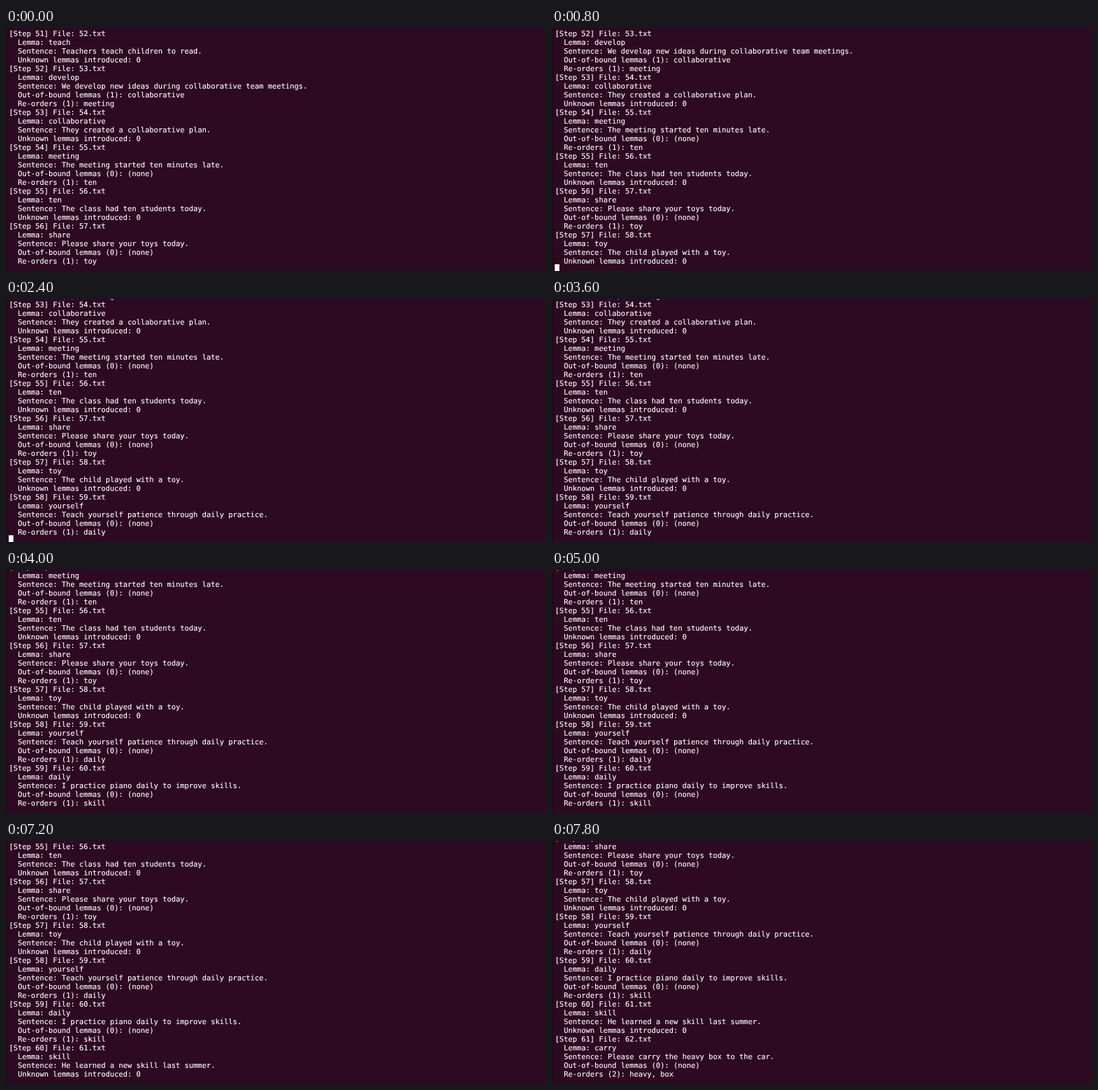
An HTML page for the animation above (8000 ms loop, 800 px wide and 361 px high).

```html
<!DOCTYPE html>
<html lang="en">
<head>
<meta charset="utf-8">
<title>Terminal log</title>
<style>
  :root { --row: 13px; --loop: 8s; }
  html, body { margin: 0; width: 100%; height: 100%; overflow: hidden; background: #2d0922; }
  .edge { position: absolute; left: 0; top: 0; width: 3px; height: 361px; background: #210a1a; }
  .screen { position: absolute; left: 0; top: 0; width: 800px; height: 353px; overflow: hidden; }
  pre {
    position: absolute; left: 4.6px; top: -11px; margin: 0;
    font: 10.8px/var(--row) "DejaVu Sans Mono", monospace;
    text-rendering: geometricPrecision;
    font-variant-ligatures: none;
    color: #fff;
    -webkit-text-stroke: 0.15px #fff;
    animation: scroll var(--loop) step-end infinite;
  }
  .cursor {
    position: absolute; left: 4px; top: 351px; width: 7px; height: 10px;
    background: #fff; opacity: 0;
    animation: blink var(--loop) step-end infinite;
  }
  /* each block of output arrives at once */
  @keyframes scroll {
    0%    { transform: translateY(0); }
    10%   { transform: translateY(calc(var(--row) * -4)); }
    27.5% { transform: translateY(calc(var(--row) * -9)); }
    47.5% { transform: translateY(calc(var(--row) * -14)); }
    70%   { transform: translateY(calc(var(--row) * -18)); }
    95%, 100% { transform: translateY(calc(var(--row) * -23)); }
  }
  @keyframes blink {
    0%, 15%, 32.5%, 45%, 60%, 75%, 90%, 100% { opacity: 0; }
    7.5%, 22.5%, 37.5%, 52.5%, 67.5%, 82.5% { opacity: 1; }
  }
</style>
</head>
<body>
<div class="edge"></div>
<div class="screen"><pre>  Unknown lemmas introduced: 0
[Step 51] File: 52.txt
  Lemma: teach
  Sentence: Teachers teach children to read.
  Unknown lemmas introduced: 0
[Step 52] File: 53.txt
  Lemma: develop
  Sentence: We develop new ideas during collaborative team meetings.
  Out-of-bound lemmas (1): collaborative
  Re-orders (1): meeting
[Step 53] File: 54.txt
  Lemma: collaborative
  Sentence: They created a collaborative plan.
  Unknown lemmas introduced: 0
[Step 54] File: 55.txt
  Lemma: meeting
  Sentence: The meeting started ten minutes late.
  Out-of-bound lemmas (0): (none)
  Re-orders (1): ten
[Step 55] File: 56.txt
  Lemma: ten
  Sentence: The class had ten students today.
  Unknown lemmas introduced: 0
[Step 56] File: 57.txt
  Lemma: share
  Sentence: Please share your toys today.
  Out-of-bound lemmas (0): (none)
  Re-orders (1): toy
[Step 57] File: 58.txt
  Lemma: toy
  Sentence: The child played with a toy.
  Unknown lemmas introduced: 0
[Step 58] File: 59.txt
  Lemma: yourself
  Sentence: Teach yourself patience through daily practice.
  Out-of-bound lemmas (0): (none)
  Re-orders (1): daily
[Step 59] File: 60.txt
  Lemma: daily
  Sentence: I practice piano daily to improve skills.
  Out-of-bound lemmas (0): (none)
  Re-orders (1): skill
[Step 60] File: 61.txt
  Lemma: skill
  Sentence: He learned a new skill last summer.
  Unknown lemmas introduced: 0
[Step 61] File: 62.txt
  Lemma: carry
  Sentence: Please carry the heavy box to the car.
  Out-of-bound lemmas (0): (none)
  Re-orders (2): heavy, box</pre></div>
<div class="cursor"></div>
</body>
</html>
```
